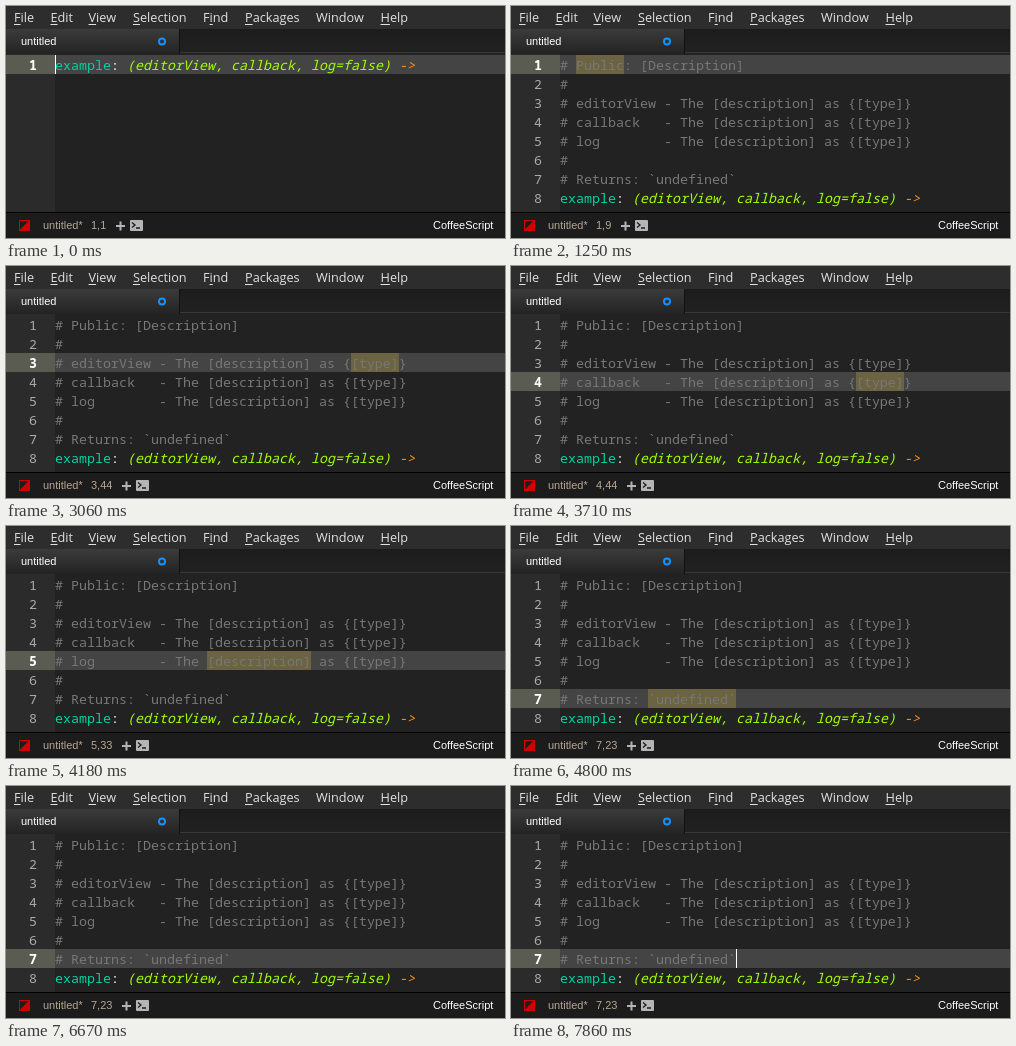
These frames come from a looping animation (499x232 px, 7930 ms). An HTML page:

```html
<!DOCTYPE html>
<html lang="en">
<head>
<meta charset="utf-8">
<style>
html, body { margin: 0; width: 100%; height: 100%; overflow: hidden; background: #222; }
div, svg, .at { position: absolute; top: 0; left: 0; white-space: pre; }
#stage { width: 499px; height: 232px; overflow: hidden; background: #222; }
#menu { width: 499px; height: 23px; background: #2d2d2d; color: #e2e2e2; font: 12.7px/23px "Open Sans", sans-serif; }
#menu u { text-underline-offset: 2px; text-decoration-thickness: 1px; }
#tabs { top: 23px; width: 499px; height: 26px; background: linear-gradient(#1c1c1c, #222); }
#tab { width: 174px; height: 25px; background: linear-gradient(#3b3b3b, #232323); box-sizing: border-box; border-right: 1px solid #111; }
#tabs, #status { color: #fff; font: 11px/24px "Liberation Sans", Arial, sans-serif; }
#edge { left: 174px; top: 23px; width: 325px; height: 1px; background: #383838; }
#gutter { top: 48px; width: 49px; height: 158px; background: #2b2b2b; }
#line { width: 450px; height: 19px; background: #444; }
#mark { width: 49px; height: 19px; background: #5a5c51; }
#select { height: 19px; background: #6b6341; }
#cursor { width: 1px; height: 19px; background: #fff; }
.row { width: 499px; height: 19px; color: #777; font: 13.333px/20px "Noto Sans Mono", monospace; }
.row b { position: absolute; top: 0; right: 468px; font-weight: 400; color: #aaa; }
.row.on b { color: #fff; font-weight: 600; }
.row p { position: absolute; top: 0; left: 49px; margin: 0; }
.name { color: #00d2a0; }
.colon { color: #fff; }
.row i { color: #a0ff00; }
.row i.arrow { color: #ff9214; }
#status { top: 206px; width: 499px; height: 26px; background: #1c1c1c; box-shadow: inset 0 1px #000; line-height: 26px; }
#file, #place { color: #b7a695; }
</style>
</head>
<body>
<div id="stage">
  <div id="menu"></div>
  <div id="tabs">
    <div id="tab"><span class="at" style="left:15px">untitled</span></div>
    <div id="edge"></div>
    <svg width="174" height="26"><circle cx="156" cy="12.5" r="3" fill="none" stroke="#1492ff" stroke-width="2"/></svg>
  </div>
  <div id="gutter"></div>
  <div id="line"></div>
  <div id="mark"></div>
  <div id="select"></div>
  <div id="rows"></div>
  <div id="cursor"></div>
  <div id="status">
    <svg width="30" height="26"><path d="M13 8h11v11h-11z" fill="#d00000"/><path d="M14 9h8.500l-8.500 8.500z" fill="#1c1c1c"/></svg>
    <span class="at" id="file" style="left:37px">untitled*</span>
    <span class="at" id="place" style="left:85px"></span>
    <svg id="icons" width="32" height="26">
      <path d="M1 14h9M5.500 9.500v9" stroke="#b5b5b5" stroke-width="2"/>
      <rect x="15" y="8" width="13" height="11" rx="1" fill="#b5b5b5"/>
      <path d="M17 10.500l3 2.500l-3 2.500M21 16h4" fill="none" stroke="#1c1c1c" stroke-width="1.300"/>
    </svg>
    <span class="at" style="left:427px">CoffeeScript</span>
  </div>
</div>
<script>
const LOOP = 7930, TOP = 49, LEFT = 49, ROW = 19, CHAR = 8;
const $ = id => document.getElementById(id);

// label, left edge, index of the underlined letter
const menu = [["File", 8, 0], ["Edit", 44.5, 0], ["View", 82.5, 0], ["Selection", 127, 0],
  ["Find", 197, 1], ["Packages", 239, 0], ["Window", 310, -1], ["Help", 374.5, 0]];
$("menu").innerHTML = menu.map(([word, x, key]) => {
  const label = [...word].map((c, i) => i === key ? `<u>${c}</u>` : c).join("");
  return `<span class="at" style="left:${x}px">${label}</span>`;
}).join("");

const code = '<span class="name">example</span><span class="colon">:</span> ' +
  '<i>(editorView, callback, log=false)</i> <i class="arrow">-&gt;</i>';
const param = name => `# ${name.padEnd(10)} - The [description] as {[type]}`;
const comments = ["# Public: [Description]", "#", ...["editorView", "callback", "log"].map(param),
  "#", "# Returns: `undefined`"];

function showRows(lines) {
  $("rows").innerHTML = lines.map((text, i) =>
    `<div class="row" style="top:${TOP + i * ROW}px"><b>${i + 1}</b><p>${text}</p></div>`).join("");
}

// start time, line, caret column, selected characters before the caret
const steps = [[0, 1, 1, 0], [1250, 1, 9, 6], [2100, 1, 24, 13], [2510, 3, 33, 13], [3060, 3, 44, 6],
  [3390, 4, 33, 13], [3710, 4, 44, 6], [4180, 5, 33, 13], [4480, 5, 44, 6], [4800, 7, 23, 11], [5500, 7, 23, 0]];
const blinks = [300, 700, 1100, 5500, 5870, 6270, 6670, 7070, 7460, 7860];

function move(id, x, y) {
  $(id).style.left = x + "px";
  $(id).style.top = y + "px";
}

function showStep([start, line, column, count]) {
  showRows(start > 0 ? [...comments, code] : [code]);
  document.querySelectorAll(".row")[line - 1].classList.add("on");
  const x = LEFT + (column - 1) * CHAR, y = TOP + (line - 1) * ROW;
  move("line", LEFT, y);
  move("mark", 0, y);
  move("cursor", x, y);
  move("select", x - count * CHAR, y);
  $("select").style.width = count * CHAR + "px";
  $("place").textContent = `${line},${column}`;
  $("icons").style.left = (column > 9 ? 115 : 109) + "px";
}

let shown;
function draw() {
  const t = performance.now() % LOOP;
  const step = steps.findLast(s => s[0] <= t);
  if (step !== shown) showStep(shown = step);
  const lit = blinks.filter(b => b <= t).length % 2 === 0;
  $("cursor").hidden = step[3] > 0 || !lit;
  requestAnimationFrame(draw);
}
draw();
</script>
</body>
</html>
```
